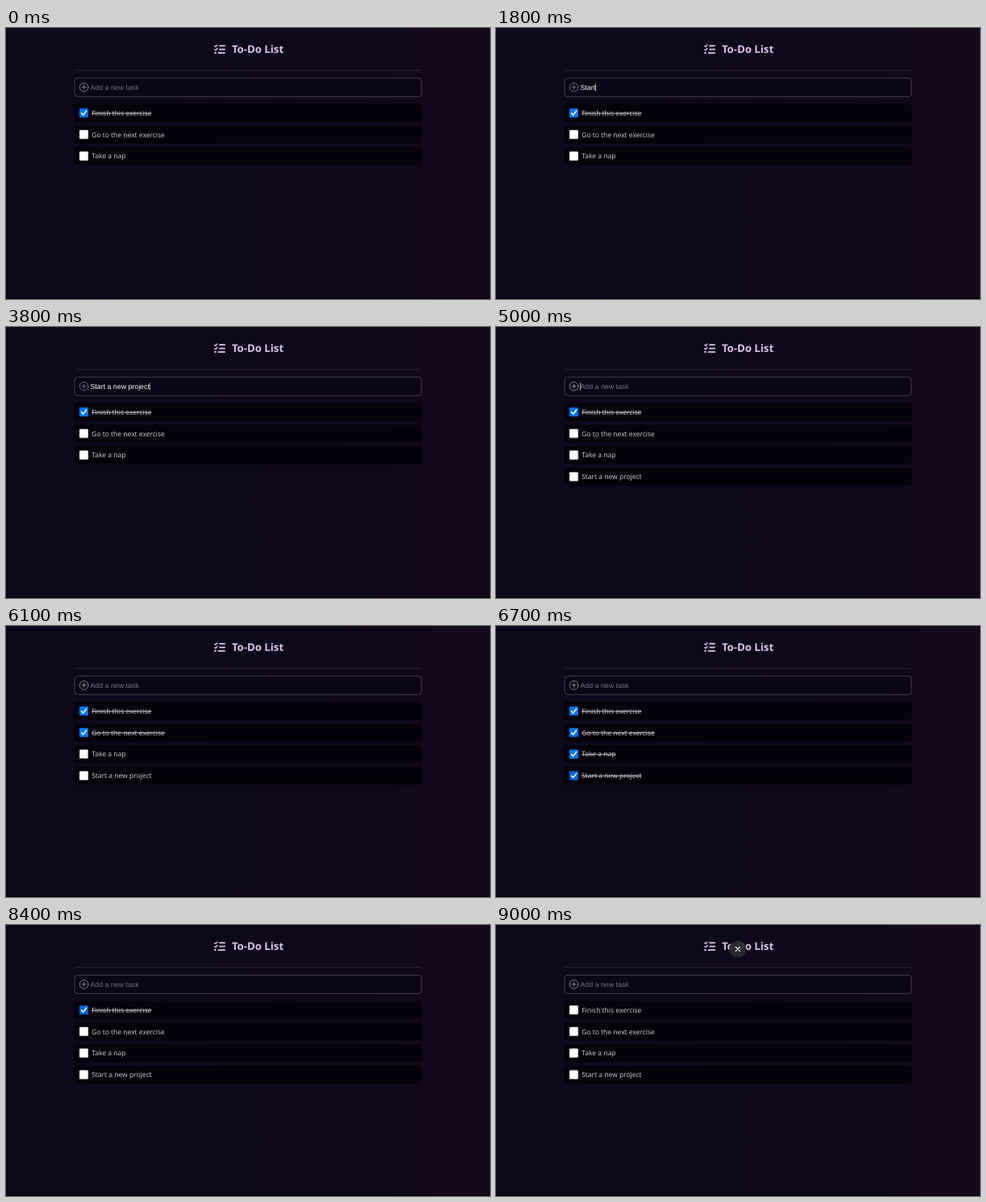
An HTML page for the animation above (9.3 s loop, 600 px wide and 337 px high).

```html
<!DOCTYPE html>
<html lang="en">
<head>
<meta charset="utf-8">
<title>To-Do List</title>
<style>
  html, body { margin: 0; width: 100%; height: 100%; overflow: hidden; background: #0d081b; }
  svg { display: block; width: 100%; height: 100%; }
  text { white-space: pre; text-rendering: geometricPrecision; }
  .title { font: bold 13.2px "Open Sans", "Noto Sans", sans-serif; fill: #dec3ea; }
  .task { font: 8.53px "Open Sans", "Noto Sans", sans-serif; fill: #d8d1de; }
  .field { font: 8.8px "Liberation Sans", Arial, sans-serif; }
  .done { text-decoration: line-through; }
  .line { fill: none; stroke-linecap: round; stroke-linejoin: round; }
</style>
</head>
<body>
<svg viewBox="0 0 600 337" preserveAspectRatio="none">
  <defs>
    <linearGradient id="bg">
      <stop offset="0" stop-color="#0d081b"/>
      <stop offset=".8" stop-color="#0f081b"/>
      <stop offset=".88" stop-color="#14081b"/>
      <stop offset="1" stop-color="#15081b"/>
    </linearGradient>
  </defs>
  <rect width="600" height="337" fill="url(#bg)"/>
  <rect y="336" width="600" height="1" fill="#030205"/>

  <g class="line" stroke="#dec3ea">
    <path stroke-width="1.75" d="M265 22.2H271.1M265 26.6H271.1M263.3 31H271.1"/>
    <path stroke-width="1.35" d="M258.7 22.3l1.2 1.1 2.2-2.5M258.7 26.7l1.2 1.1 2.2-2.5"/>
  </g>
  <circle cx="259.4" cy="31" r="1.3" fill="#dec3ea"/>
  <text class="title" x="279.9" y="31.2">To-Do List</text>
  <path d="M85 52.8H515" stroke="#30283b" stroke-width=".9"/>

  <rect x="85.1" y="62.3" width="429.9" height="23" rx="3.8" fill="#0b0616" stroke="#4c4358" stroke-width=".9"/>
  <g id="plus" class="line" stroke-width=".8">
    <circle cx="96.6" cy="73.7" r="5.4"/>
    <path d="M94 73.7h5.2M96.6 71.1v5.2"/>
  </g>
  <text id="field" class="field" x="104.5" y="76.9"></text>
  <rect id="caret" y="69.3" width=".7" height="9.4" fill="#fff"/>

  <g id="rows"></g>

  <g id="close">
    <circle r="10.6" fill="#2b2a2f" fill-opacity=".93"/>
    <path class="line" d="M-2.6-2.6L2.6 2.6M2.6-2.6L-2.6 2.6" stroke="#fff" stroke-width="1.2"/>
  </g>
</svg>
<script>
const LOOP = 9300;
const ADDED = 4200;
const TYPED = 'Start a new project';
const KEYS = [1200, 1400, 1500, 1700, 1800, 1900, 2000, 2100, 2300, 2500,
  2600, 2800, 2900, 3000, 3000, 3200, 3300, 3500, 3800];

// on/off: when the task is ticked; hover: pairs of enter and leave times
const TASKS = [
  { name: 'Finish this exercise', on: 0, off: 8500, hover: [8100, 8600] },
  { name: 'Go to the next exercise', on: 5700, off: 7800, hover: [5400, 5900, 7700, 7900] },
  { name: 'Take a nap', on: 6200, off: 7500, hover: [5900, 6300, 7400, 7600] },
  { name: TYPED, on: 6600, off: 7100, hover: [6500, 7200] }
];

const $ = id => document.getElementById(id);
const within = (t, a, b) => t >= a && t < b;

function add(parent, tag, attrs) {
  const el = document.createElementNS('http://www.w3.org/2000/svg', tag);
  for (const key in attrs) el.setAttribute(key, attrs[key]);
  return parent.appendChild(el);
}

const rows = TASKS.map((task, i) => {
  const g = add($('rows'), 'g', { transform: `translate(0 ${i * 26.8})` });
  add(g, 'rect', { x: 84.7, y: 94.6, width: 430.5, height: 22.3, rx: 3.2, fill: '#04020a' });
  const box = add(g, 'rect', { x: 91.15, y: 100.25, width: 10.6, height: 10.8, rx: 1, 'stroke-width': .5 });
  const tick = add(g, 'path', { class: 'line', d: 'M93.6 105.9l2.1 2.3 4-5.2', stroke: '#fff', 'stroke-width': 1.5 });
  const label = add(g, 'text', { class: 'task', x: 106.2, y: 108.8 });
  label.textContent = task.name;
  return { g, box, tick, label };
});

const show = (el, on) => el.setAttribute('visibility', on ? 'visible' : 'hidden');

function drawField(t) {
  const count = t < ADDED ? KEYS.filter(k => t >= k).length : 0;
  const field = $('field');
  const text = count ? TYPED.slice(0, count) : 'Add a new task';
  if (field.textContent !== text) field.textContent = text;
  field.setAttribute('fill', count ? '#fff' : '#77727d');
  $('plus').setAttribute('stroke', count ? '#85808c' : '#a39dab');
  $('caret').setAttribute('x', 104.4 + (count ? field.getComputedTextLength() : 0));
  show($('caret'), within(t, 300, 700) || within(t, 1100, 4600) || within(t, 5000, 5400));
}

function drawRow(t, task, { g, box, tick, label }, i) {
  const done = within(t, task.on, task.off);
  const hover = task.hover.some((start, n) => n % 2 === 0 && within(t, start, task.hover[n + 1]));
  const fill = done ? (hover ? '#0063d8' : '#0075ff') : '#fff';
  box.setAttribute('fill', fill);
  box.setAttribute('stroke', done ? fill : hover ? '#777' : '#c9c7cc');
  show(g, i < 3 || t >= ADDED);
  tick.setAttribute('opacity', done ? 1 : 0);
  label.classList.toggle('done', done);
}

function drawClose(t) {
  const step = Math.min(3, Math.floor((t - 8800) / 100) + 1);
  show($('close'), step > 0);
  $('close').setAttribute('transform', `translate(299.7 ${13.5 + step * 5.5})`);
  $('close').setAttribute('opacity', Math.max(0, step / 3));
}

function draw(now) {
  const t = now % LOOP;
  drawField(t);
  TASKS.forEach((task, i) => drawRow(t, task, rows[i], i));
  drawClose(t);
}

function tick(now) {
  draw(now);
  requestAnimationFrame(tick);
}

draw(0);
requestAnimationFrame(tick);
</script>
</body>
</html>
```
